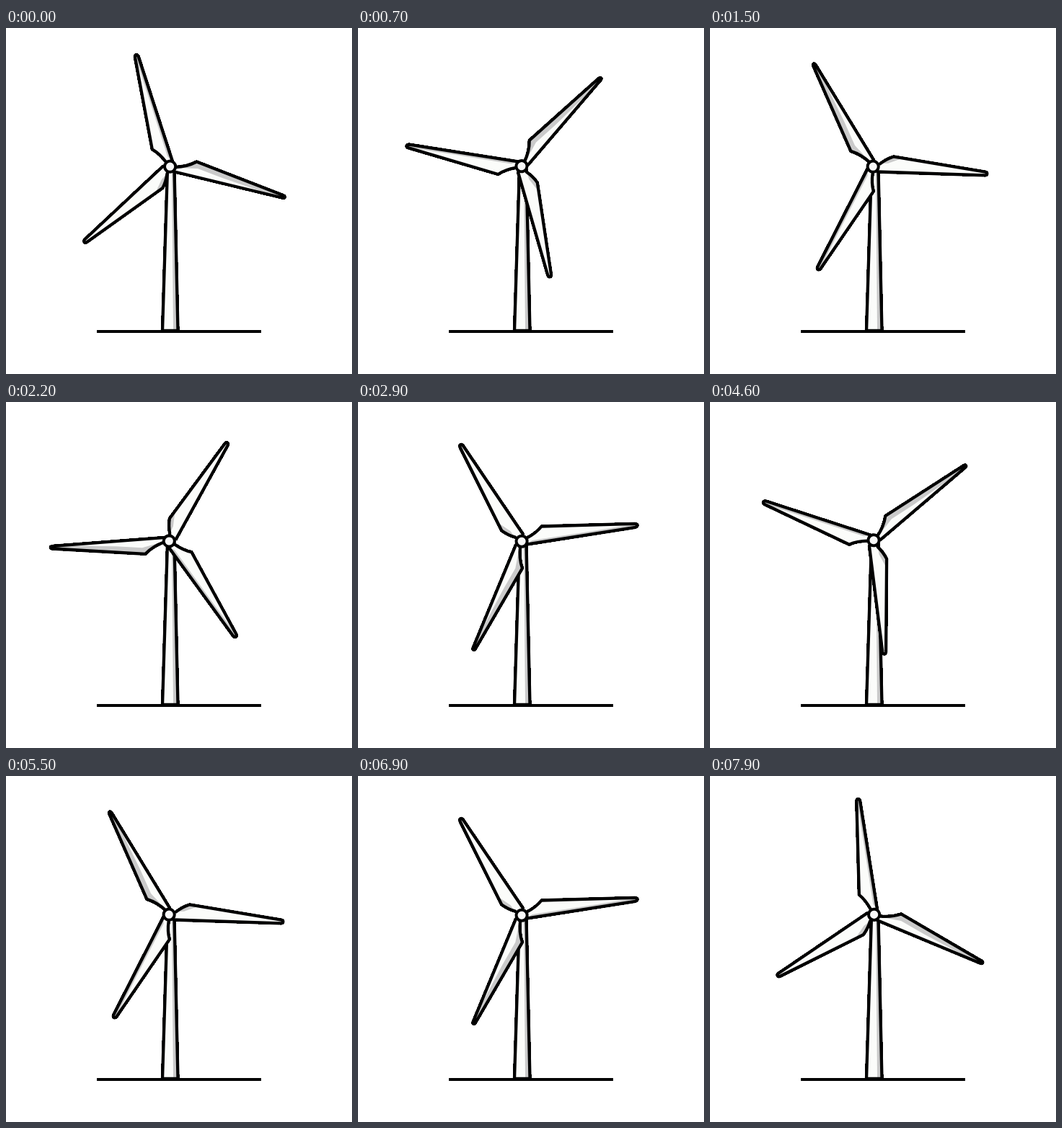
These frames come from a looping animation (480 px wide and 480 px high, 8000 ms). An HTML page:

```html
<!DOCTYPE html>
<html lang="en">
<head>
<meta charset="utf-8">
<title>Wind turbine</title>
<style>
  html, body { margin: 0; width: 100%; height: 100%; overflow: hidden; background: #fff; }
  svg { display: block; width: 100%; height: 100%; }
  .rim, .line { fill: none; stroke: #000; stroke-width: 4.3; stroke-linejoin: round; stroke-linecap: round; }
  .rim { shape-rendering: crispEdges; }
  .body { fill: #fbfcfa; }
  .shade { fill: #cacaca; }
</style>
</head>
<body>
<svg viewBox="0 0 480 480">
  <g id="tower"></g>
  <path d="M126 421H354" stroke="#000" stroke-width="4"/>
  <g id="rotor"></g>
</svg>
<script>
const STEP_MS = 100;
const STEP_DEG = -9;
const STEPS_PER_TURN = 40;
const AXIS = "226.9 192.5";

const tower = {
  outline: "M224 196L217 420H238.5L233.5 196",
  shade: "M230 196L232 420H238.5L233.5 196Z"
};

const blades = [
  {
    outline: "M231 185L183.7 39.5Q182.4 36.8 180.3 37.3Q178.6 38 179 41L202.8 168.3Q213 174 222 186",
    shade: "M231 185L183.5 39L180 39L182 48L200 103L224 178Z"
  },
  {
    outline: "M235 193Q251 192.5 264.5 185.5L385 232.3Q387.3 233.6 386.6 235Q385.8 236.3 383 235.5L234 199.5",
    shade: "M237 194Q251 193 264.5 186L386 233L383 235.5L370 232L300 208L266 195Z"
  },
  {
    outline: "M217.5 192L109.3 293.3Q107.4 295.5 108.7 297Q110 298.4 112.3 297L217.3 222Q222 213 223.5 202",
    shade: "M223.5 202Q222 213 217.3 222L208 227L216 210Z"
  }
];

// The crisp rim hardens the outer edge; the fill keeps the inner edge smooth.
const inked = ({ outline, shade }) => `
  <path class="rim" d="${outline}"/>
  <path class="body" d="${outline}Z"/>
  <path class="shade" d="${shade}"/>
  <path class="line" d="${outline}"/>`;

const rotor = document.getElementById("rotor");
document.getElementById("tower").innerHTML = inked(tower);
rotor.innerHTML = blades.map(inked).join("") +
  `<circle cx="227.6" cy="192.2" r="7.6" fill="#f8f8f8" stroke="#000" stroke-width="4"/>`;

function draw(time) {
  const step = Math.floor(time / STEP_MS) % STEPS_PER_TURN;
  rotor.setAttribute("transform", `rotate(${step * STEP_DEG} ${AXIS})`);
}

let start;
function tick(now) {
  start ??= now;
  draw(now - start);
  requestAnimationFrame(tick);
}
draw(0);
requestAnimationFrame(tick);
</script>
</body>
</html>
```
